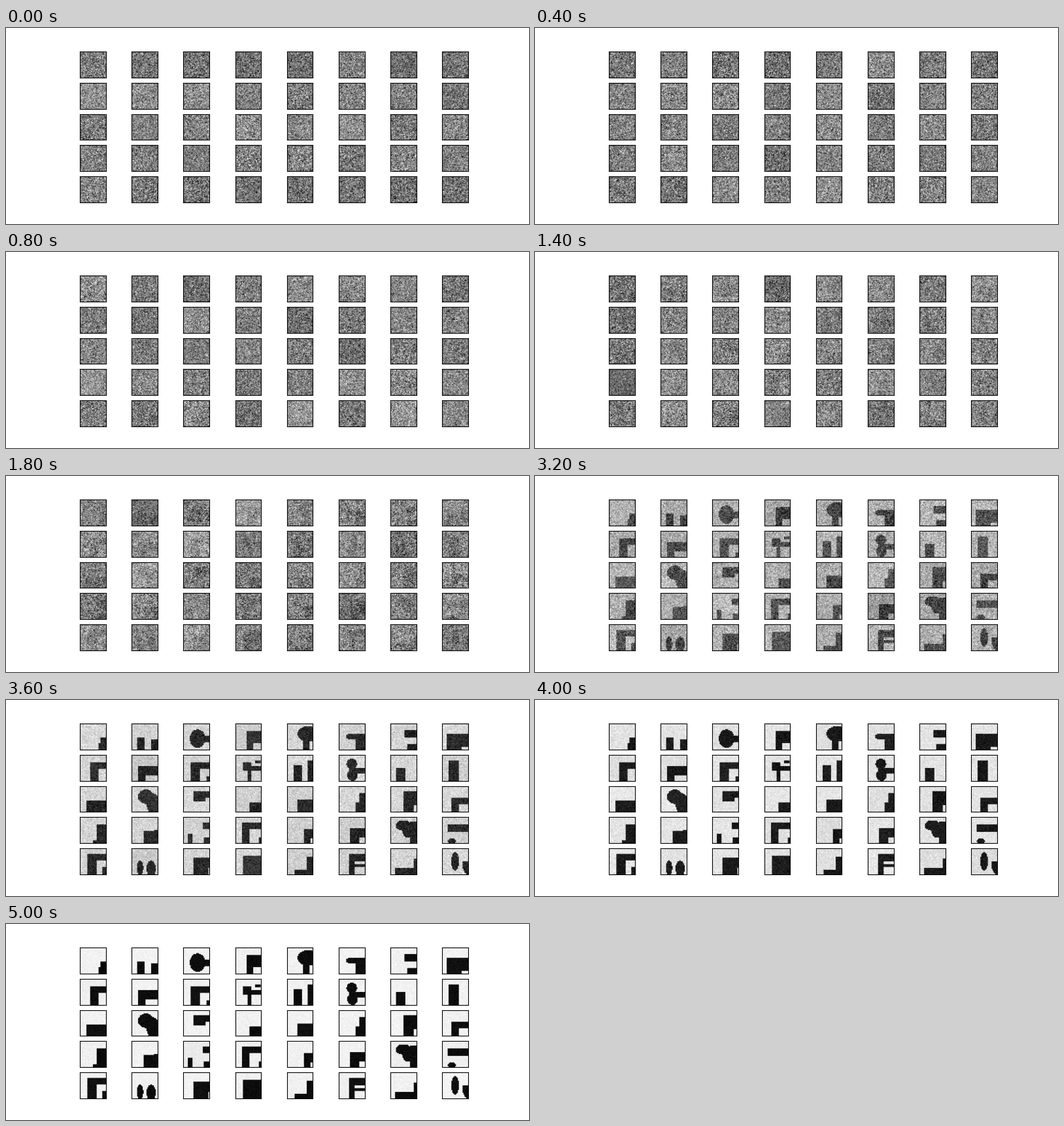
A matplotlib script for the animation above (5.4 s loop, 800x300 px).

```python
import numpy as np
import matplotlib.pyplot as plt
from matplotlib.animation import FuncAnimation

ROWS, COLS, N = 5, 8, 28
SIDE = 40                 # shapes are laid out on a 40 x 40 square
FRAMES, LAST = 27, 24     # the picture rests after the last step

centre = (np.arange(N) + 0.5) * SIDE / N
X, Y = np.meshgrid(centre, centre)


def bar(left, right, top, bottom=SIDE):
    return (X > left) & (X < right) & (Y > top) & (Y < bottom)


def corner(left, top):
    """Everything right of and below a point."""
    return bar(left, SIDE, top)


def angle(left, top, inner_left, inner_top):
    """A corner with a smaller corner cut out of it."""
    return corner(left, top) & ~corner(inner_left, inner_top)


def disc(x, y, rx, ry):
    return ((X - x) / rx) ** 2 + ((Y - y) / ry) ** 2 < 1


def row1():
    yield corner(28, 30) | corner(32, 22)
    yield bar(9, 20, 21) | corner(30, 24)
    yield disc(22, 23, 12, 14) | bar(32, 40, 19, 28)
    yield angle(17, 12, 27, 30)
    yield disc(32, 16, 16, 12) | bar(24, 34, 20)
    yield disc(20, 20, 9, 5) | corner(26, 15)
    yield bar(21, 40, 10, 21) | corner(25, 32)
    yield angle(7, 16, 30, 35)


def row2():
    yield angle(16, 11, 28, 22)
    yield angle(10, 17, 21, 32)
    yield angle(11, 11, 25, 21) | corner(35, 33)
    yield (bar(12, 25, 12, 25) | bar(24, 40, 17, 25)
           | bar(30, 38, 8, 13) | bar(18, 25, 24))
    yield bar(10, 23, 16) | corner(32, 9)
    yield disc(20, 14, 8, 8) | disc(21, 31, 8, 9) | bar(16, 40, 20, 28)
    yield bar(9, 23, 20)
    yield bar(10, 26, 9)


def row3():
    yield corner(10, 23)
    yield disc(22, 17, 12, 11) | disc(33, 28, 10, 16)
    yield bar(15, 40, 9, 18) | bar(16, 35, 17, 25)
    yield corner(21, 25)
    yield corner(16, 21)
    yield corner(25, 25) | corner(32, 12)
    yield angle(20, 8, 36, 30)
    yield angle(14, 18, 25, 28)


def row4():
    yield corner(25, 12) | corner(20, 35)
    yield corner(19, 22) | corner(34, 20)
    yield bar(30, 40, 9, 18) | bar(7, 15, 26) | corner(32, 31)
    yield angle(10, 9, 21, 18) | corner(35, 31)
    yield angle(26, 19, 36, 33)
    yield angle(17, 17, 31, 32)
    yield disc(20, 13, 12, 8) | disc(27, 20, 9, 12) | corner(30, 7)
    yield bar(9, 40, 12, 23) | disc(15, 37, 6, 4)


def row5():
    yield angle(11, 9, 26, 19) | corner(34, 28)
    yield disc(13, 30, 5, 11) | disc(30, 31, 7, 12)
    yield angle(16, 14, 38, 30)
    yield corner(12, 12)
    yield corner(12, 33) | corner(30, 13)
    yield angle(15, 8, 24, 29) & ~bar(24, 40, 20, 24)
    yield corner(7, 30) | corner(35, 15)
    yield disc(20, 20, 6, 14) | (disc(40, 22, 9, 18) & corner(31, 20))


shapes = np.array([s for row in (row1, row2, row3, row4, row5) for s in row()])
clean = np.where(shapes, -1.0, 1.0)


def noise_level(step):
    """Noise-to-signal ratio of a diffusion run with linear betas."""
    t = max(950 - 50 * step, 9 + 4 * (LAST - step))
    beta_sum = 1e-4 * t + 0.0199 * t ** 2 / 2000
    return np.sqrt(np.expm1(beta_sum))


fig, axes = plt.subplots(ROWS, COLS, figsize=(8, 3), dpi=100)
images = []
for ax, img in zip(axes.flat, clean):
    ax.set_xticks([])
    ax.set_yticks([])
    images.append(ax.imshow(img, cmap="gray"))


def update(frame):
    step = min(frame, LAST)
    rng = np.random.default_rng(100 + step)
    noisy = clean + noise_level(step) * rng.standard_normal(clean.shape)
    for im, data in zip(images, noisy):
        im.set_data(data)
        im.autoscale()
    return images


anim = FuncAnimation(fig, update, frames=FRAMES, interval=200,
                     init_func=lambda: update(0), repeat=True, repeat_delay=0)
plt.show()
```
